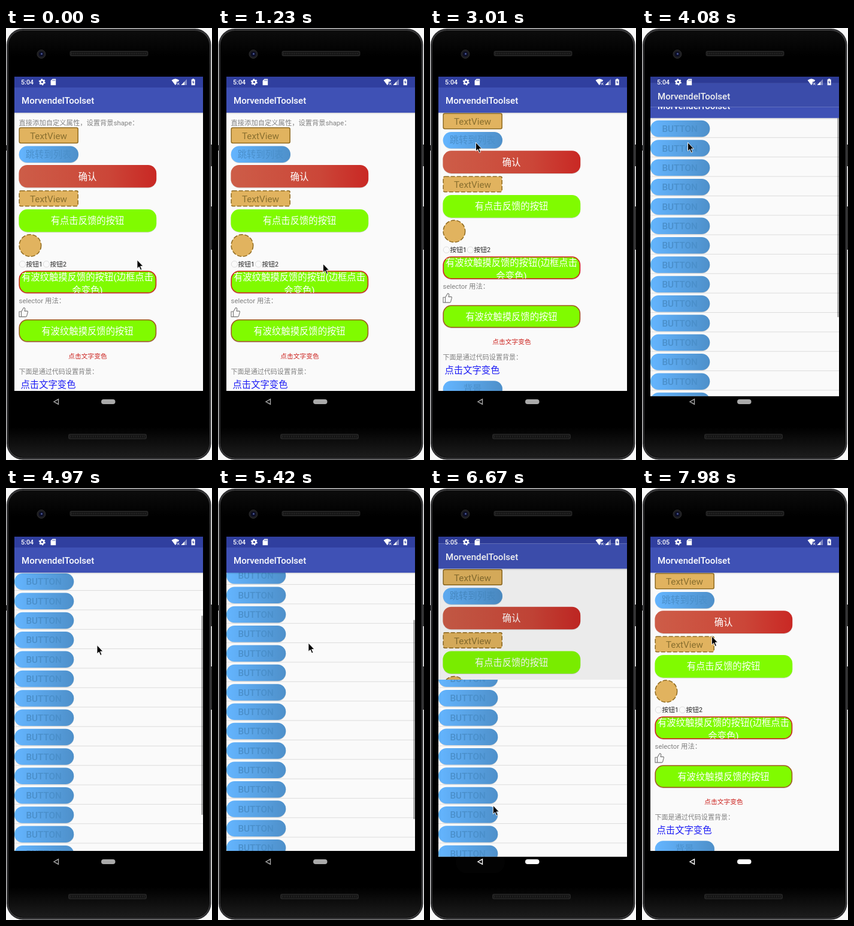
Animation of 344 by 719 pixels, one loop 8000 ms. Source, as an HTML page:

```html
<!DOCTYPE html>
<html lang="zh-CN">
<head>
<meta charset="utf-8">
<title>Phone demo</title>
<style>
html, body { margin: 0; width: 100%; height: 100%; overflow: hidden; background: #f8f8f8; }
svg { display: block; width: 344px; height: 719px; }
text { font-family: Roboto, "Noto Sans CJK SC", "Noto Sans CJK", sans-serif; white-space: pre; }
</style>
</head>
<body>
<svg id="stage" viewBox="0 0 344 719"></svg>
<script>
const stage = document.getElementById('stage');
const FADED = '#4a8fca', GREEN = '#80fb00', SAND = '#e1b35f', BROWN = '#8f6a1f';
const ROW = 32.35, ROWS = 20, TOP = 141, VIEW = 463;

const text = (x, y, size, fill, str, more = '') =>
  `<text x="${x}" y="${y}" font-size="${size}" fill="${fill}" ${more}>${str}</text>`;
const mid = (x, y, size, fill, str, more = '') =>
  text(x, y, size, fill, str, 'text-anchor="middle" ' + more);
const rect = (x, y, w, h, fill, r = 0, more = '') =>
  `<rect x="${x}" y="${y}" width="${w}" height="${h}" rx="${r}" fill="${fill}" ${more}/>`;
const line = (color, width = 1.5) => `stroke="${color}" stroke-width="${width}"`;
const gradient = (id, ...stops) => `<linearGradient id="${id}">` +
  stops.map(([at, color]) => `<stop offset="${at}" stop-color="${color}"/>`).join('') + '</linearGradient>';

const shadow = (x, y, w, h, r) => rect(x, y + 1, w, h, '#000', r, 'opacity=".14"');
const wide = (y, fill) => shadow(21.5, y, 229.7, 37.6, 14) + rect(21.5, y, 229.7, 37.6, fill, 14);
const outlined = (y, color) =>
  shadow(21.5, y, 229.7, 37.6, 14) + rect(22.25, y + .75, 228.2, 36.1, GREEN, 13.3, line(color));
const pill = (x, y) => shadow(x, y, 99.3, 27.5, 13.7) + rect(x, y, 99.3, 27.5, 'url(#blue)', 13.7);
const label = (y, more) =>
  rect(22.2, y, 98, 25.5, SAND, 2.5, line(BROWN) + more) + mid(71, y + 19, 15.3, '#8a7030', 'TextView');
const radio = (x, str) =>
  `<circle cx="${x}" cy="393" r="5.2" fill="none" ${line('#dcdcdc', 1)}/>` + text(x + 6, 397, 10.73, '#222', str);

const header = `
  ${rect(14, TOP, 315, 2, '#000', 0, 'opacity=".1"')}
  ${rect(14, 81, 315, 18, '#303f9f')}${rect(14, 99, 315, TOP - 99, '#3f51b5')}
  ${text(26, 126.4, 15.1, '#fff', 'MorvendelToolset', 'font-weight="500"')}`;
const page = body => `
  ${rect(14, 81, 315, 561, '#fafafa')}
  <g clip-path="url(#view)">${body}</g>
  ${header}${rect(14, TOP + VIEW, 315, 60, '#000')}`;

const home = page(`<g id="homeBody">
  ${text(21.5, 161.5, 11.3, '#808080', '直接添加自定义属性，设置背景shape：')}
  ${label(166, '')}
  ${pill(21.7, 196.6)}${mid(71, 215.8, 15.35, FADED, '跳转到列表')}
  ${wide(228, 'url(#red)')}${mid(136, 252.8, 15.35, '#fff', '确认')}
  ${label(271, ' stroke-dasharray="7 3"')}
  ${wide(301.8, GREEN)}${mid(136, 326.2, 15.35, '#fff', '有点击反馈的按钮')}
  <circle cx="40.4" cy="362" r="18.3" fill="${SAND}" ${line(BROWN)} stroke-dasharray="7 3"/>
  ${radio(27.5, '按钮1')}${radio(67.5, '按钮2')}
  ${outlined(404, '#d01c1c')}
  <g clip-path="url(#twoLines)">
    ${mid(136, 420, 15.35, '#fff', '有波纹触摸反馈的按钮(边框点击')}
    ${mid(136, 442, 15.35, '#fff', '会变色)')}
  </g>
  ${text(21.5, 458, 11.4, '#808080', 'selector 用法：')}
  <path d="M22 472h3.6v8.6H22zM25.6 472l4-6.5q2.2 0 2.2 2.6l-.7 3h4q1.7 0 1.2 2l-1.7 6.2q-.4 1.3-1.7 1.3h-7.3z"
    fill="none" ${line('#777', 1.1)} stroke-linejoin="round"/>
  ${outlined(485, '#a0561e')}${mid(136, 509.5, 15.35, '#fff', '有波纹触摸反馈的按钮')}
  ${text(104.3, 549.5, 10.73, '#cc2420', '点击文字变色')}
  ${text(21.5, 576, 11.05, '#808080', '下面是通过代码设置背景：')}
  ${text(24.5, 598.8, 15.35, '#1c1cf5', '点击文字变色')}
  ${pill(21.7, 611)}${mid(71, 630, 15.35, FADED, '背景')}
</g>`);

const rows = Array.from({ length: ROWS }, (_, i) => `<g transform="translate(0 ${i * ROW})">
  ${pill(14, 145)}${mid(63.2, 164.4, 15.3, FADED, 'BUTTON', 'font-weight="500"')}
  ${rect(14, 173, 315, 1, '#dcdcdc')}</g>`).join('');
const list = page(`<g id="listBody">${rows}</g>
  ${rect(326, TOP, 3, VIEW * VIEW / (ROWS * ROW), '#000', 0, 'id="thumb"')}`);

const speaker = (x, y) =>
  rect(x, y, 131, 9, '#242424', 3) + rect(x + 2, y + 2, 127, 5, '#111', 2) +
  `<path d="M${x + 3} ${y + 4.5}h125" ${line('#333', 3)} stroke-dasharray="1 2"/>`;
const phone = `
  ${rect(0, 195, 4, 9, '#222')}${rect(340, 194, 4, 36, '#333')}${rect(340, 297, 4, 72, '#333')}
  ${rect(1, 1, 341.5, 717.5, '#2b2b2d', 27)}
  ${rect(3, 3.5, 337.5, 712.5, '#101010', 25.5, line('#4c4c4e', 1))}
  ${rect(4, 5, 335.6, 709, 'url(#body)', 25)}
  ${rect(4, 60, 335.6, 590, '#000')}
  ${speaker(106.5, 38)}${speaker(104, 675.5)}
  <circle cx="59" cy="43.5" r="7" fill="#1d1d21" ${line('#2c2c2e', 1)}/>
  <circle cx="59" cy="43.5" r="4" fill="#0b0d25"/><circle cx="59.5" cy="43" r="1.6" fill="#4a5795"/>`;

const status = `
  ${text(25, 94, 10.7, '#fff', '5:04', 'id="clock" font-weight="500"')}
  <circle cx="60.3" cy="90" r="3" fill="none" ${line('#fff', 2.4)}/>
  <circle cx="60.3" cy="90" r="4.7" fill="none" ${line('#fff', 1.6)} stroke-dasharray="2.46 2.46"/>
  <path d="M77.5 84.8h5.7v10.4h-8.6v-7.4z" fill="#fff"/>
  <path d="M78 86.2v2M79.8 86.2v2M81.6 86.2v2" ${line('#303f9f', .8)}/>
  <path d="M276.5 87q6.3-5 12.8 0l-2 2.6h-2.5v3l-2 2.6z" fill="#fff"/>
  <path d="M285.8 91l3.6 3.8m0-3.8l-3.6 3.8" ${line('#fff', 1)}/>
  <path d="M302 85v10h-9.6z" fill="#fff" opacity=".4"/><path d="M298 89.2V95h-5.6z" fill="#fff"/>
  <path d="M311.2 84.6h2.8v1h1.6v9.6h-6v-9.6h1.6z" fill="#fff"/>
  <path d="M313 87l-2 3.6h1.4v3l2-3.8h-1.4z" fill="#303f9f"/>`;

const nav = `${rect(43, 604, 82, 37, '#fff', 18, 'id="ripple"')}
  <g id="keys"><path d="M80 622l7.5-4.2v8.4z" fill="none" stroke="currentColor" stroke-width="1.4"/>
  ${rect(159, 618, 23.5, 8, 'currentColor', 4)}</g>`;

stage.innerHTML = `<defs>
  ${gradient('blue', [0, '#64b5ff'], [1, '#4e90ca'])}
  ${gradient('red', [0, '#cd5d48'], [.65, '#cb4638'], [1, '#c92824'])}
  <linearGradient id="body" x1="0" y1="0" x2="0" y2="1"><stop stop-color="#0c0c0c"/>
    <stop offset=".06"/><stop offset=".93"/><stop offset="1" stop-color="#1c1c1c"/></linearGradient>
  <clipPath id="screen">${rect(14, 81, 315, 561, '#000')}</clipPath>
  <clipPath id="view">${rect(14, TOP, 315, VIEW, '#000')}</clipPath>
  <clipPath id="twoLines">${rect(22, 405, 229, 36, '#000')}</clipPath>
  <clipPath id="reveal"><rect id="revealBox" x="14" width="315" height="700"/></clipPath>
  </defs>
  ${phone}
  <g clip-path="url(#screen)">
    <g id="home">${home}</g>
    ${rect(14, 81, 315, 561, '#000', 0, 'id="dim"')}
    <g id="list" clip-path="url(#reveal)">${list}</g>
  </g>
  ${status}${nav}
  <path id="pointer" d="M0 0V14.4L3.3 11.4 5.7 17 8 16 5.6 10.6H10z" fill="#000" ${line('#fff', .9)} stroke-linejoin="round"/>`;

// Linear keyframes: [time, value, value...]
function track(keys, t) {
  const i = keys.findIndex(k => k[0] > t);
  if (i < 0) return keys[keys.length - 1].slice(1);
  if (!i) return keys[0].slice(1);
  const a = keys[i - 1], b = keys[i], u = (t - a[0]) / (b[0] - a[0]);
  return a.slice(1).map((v, j) => v + (b[j + 1] - v) * u);
}
const path = [
  [260, 219, 386], [450, 204, 367], [870, 175, 386], [1040, 175, 386], [1140, 176, 396],
  [1230, 175.5, 392.5], [1290, 175.5, 392.5], [1770, 83, 175], [1850, 83, 175], [2120, 86, 184],
  [2290, 86, 184], [2460, 86.5, 153.5], [2540, 86.5, 153.5], [2740, 77, 191], [3010, 76.5, 190.5],
  [4500, 76.5, 190.5], [4710, 148, 350], [4970, 152, 261.5], [5040, 152, 260], [5330, 152, 252],
  [5410, 152, 252], [6090, 87, 620], [6500, 87, 620], [7190, 161, 250], [7270, 161, 250],
  [7360, 155, 224], [7880, 155, 224], [7980, 116.5, 246.5]
];
const homeScroll = [[2290, 0], [2460, 15.5], [2540, 15.5], [2700, 23.7]];
const listScroll = [[4720, 0], [4960, 100], [5040, 100], [5330, 110]];
const thumbFade = [[5420, .3], [5680, 0]];
const rippleFade = [[6100, 0], [6180, .1], [6480, .1], [6700, 0]];

const $ = id => document.getElementById(id);
const move = (id, x, y) => $(id).setAttribute('transform', `translate(${x} ${y})`);
const unit = v => Math.min(1, Math.max(0, v));

function draw(t) {
  const u = unit((t - 3890) / 425), v = unit((t - 6480) / 425);
  const ease = v * v * (3 - 2 * v);
  const shown = v ? 1 - ease : 1 - (1 - u) ** 1.6;
  const cut = v ? ease : (1 - u) ** 4.3;
  move('home', 0, -11.5 * shown);
  $('dim').setAttribute('opacity', .1 * shown);
  move('list', 0, 23 * (1 - shown));
  $('list').style.display = u > 0 && v < 1 ? '' : 'none';
  $('revealBox').setAttribute('y', 81 + 538 * cut);

  const scroll = track(listScroll, t)[0];
  move('homeBody', 0, -track(homeScroll, t)[0]);
  move('listBody', 0, -scroll);
  move('thumb', 0, scroll * VIEW / (ROWS * ROW));
  $('thumb').setAttribute('opacity', track(thumbFade, t)[0]);
  $('ripple').setAttribute('opacity', track(rippleFade, t)[0]);
  $('keys').style.color = t < 6230 ? '#aaa' : '#fff';
  $('clock').textContent = t < 5800 ? '5:04' : '5:05';
  move('pointer', ...track(path, t));
}
function tick() {
  draw(performance.now() % 8000);
  requestAnimationFrame(tick);
}
tick();
</script>
</body>
</html>
```
